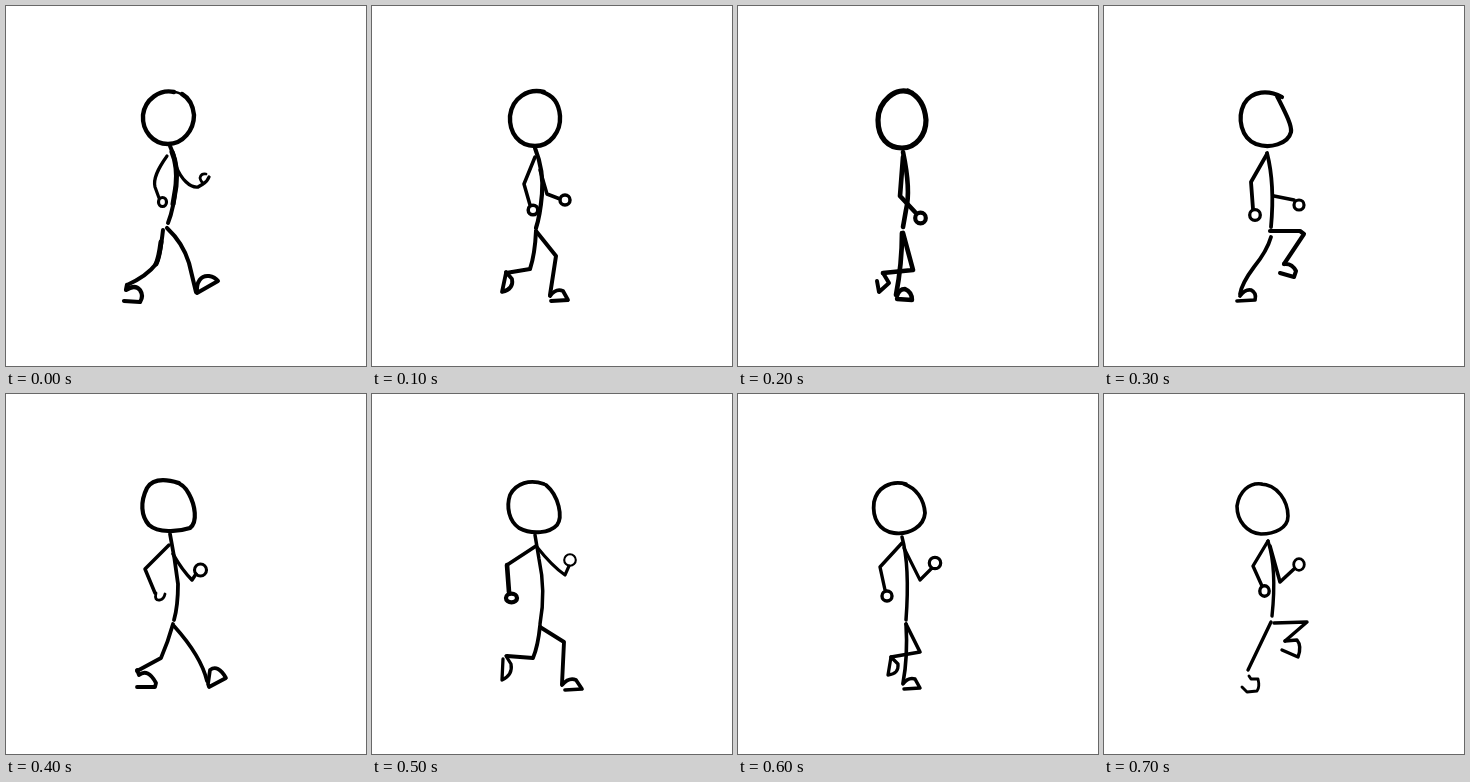
Animation, 360 px wide and 360 px high, one loop 0.8 s. Source, as an HTML page with a canvas:

```html
<!DOCTYPE html>
<html lang="en">
<head>
<meta charset="utf-8">
<title>Walk cycle</title>
<style>
html, body { margin: 0; width: 100%; height: 100%; overflow: hidden; background: #fff; }
canvas { display: block; width: 360px; height: 360px; }
</style>
</head>
<body>
<canvas id="stage" width="360" height="360"></canvas>
<script>
const ctx = document.getElementById('stage').getContext('2d');
const STEP = 100;

const oval = (x, y, rx, ry = rx) =>
  `M${x - rx} ${y}a${rx} ${ry} 0 1 0 ${2 * rx} 0a${rx} ${ry} 0 1 0 ${-2 * rx} 0`;

// Each pose lists strokes as [line width, path].
const poses = [
  [ // stride, left contact
    [4.4, 'M168 86C154 83 139 93 137 109C136 125 147 138 162 138C177 138 188 124 188 109C187 99 183 92 176 88'],
    [2.6, 'M166 85.5Q173 86 178 90'],
    [4, 'M164 140Q172 156 170 178Q168 202 162 217'],
    [5, 'M166 146Q172 160 170 180L167 198'],
    [3.2, 'M161 150C151 164 147 173 149 181L153 192' + oval(156.5, 196, 4, 4.5)],
    [3.3, 'M170 160C175 173 184 182 192 181L197 178Q201 176 203 171'],
    [2.8, 'M200 168Q195 167 194 172Q195 176 197 177'],
    [4, 'M157 224Q154 251 150 258Q141 270 121 279'],
    [5, 'M155 236Q153 252 150 258'],
    [4.2, 'M121 279L120 284Q129 278 134 284Q138 290 134 296L118 295'],
    [4.1, 'M161 222Q177 237 183 257L190 286'],
    [4, 'M191 287C190 276 195 269 203 270Q209 271 212 275L191 287']
  ],
  [ // weight settles
    [4.4, 'M172 86C156 82 140 92 138 110C137 127 147 140 163 140C178 140 189 126 188 110C187 98 181 89 170 86'],
    [4.2, 'M163 142Q172 165 170 188Q168 210 164 222'],
    [3.5, 'M163 151L152 178L158 199' + oval(161, 204, 4.8)],
    [3.5, 'M168 164L175 188L188 193' + oval(193, 194, 5)],
    [4, 'M164 225Q163 248 158 263L134 267'],
    [3.8, 'M134 267L130 286Q142 283 140 273L134 266'],
    [4, 'M164 225L184 250L178 289'],
    [3.8, 'M178 290Q184 282 191 285L196 294L179 295']
  ],
  [ // legs pass
    [5.2, 'M174 87C158 79 140 96 140 114C140 132 150 142 164 142C178 142 188 129 188 114C187 101 181 90 170 85'],
    [4.6, 'M165 146Q173 184 168 204L165 221'],
    [4.6, 'M165 151L162 190L177 206'],
    [4.2, oval(182.5, 212, 5.3)],
    [4.7, 'M165 227L175 264L145 267'],
    [4, 'M145 267L151 277L141 286L139 275'],
    [4.7, 'M164 227Q164 258 158 289'],
    [4.4, 'M159 290Q161 283 167 283Q174 286 174 294L159 293']
  ],
  [ // knee up
    [4.2, 'M178 91C165 84 148 84 140 98C133 112 137 132 152 138C166 143 184 138 187 126C188 119 181 106 173 90'],
    [3.8, 'M163 147Q171 178 167 221'],
    [3.8, 'M163 148L147 176L149 203'],
    [3.3, oval(151, 209, 5.3)],
    [3.8, 'M170 190L190 194'],
    [3.2, oval(195, 199, 5)],
    [4.1, 'M166 225L196 225L200 228L180 258'],
    [4, 'M180 258Q188 257 192 265L190 271L176 267'],
    [3.8, 'M167 231Q163 245 150 261Q138 277 136 288'],
    [3.7, 'M136 290Q141 283 147 284Q153 287 151 294L133 295']
  ],
  [ // stride, right contact
    [4.2, 'M173 89C160 85 147 84 141 94C134 108 135 122 143 131C152 139 172 138 184 134C192 128 189 111 183 100Q178 90 169 88'],
    [3.8, 'M164 140Q169 165 172 190Q172 212 168 226'],
    [3.5, 'M163 151L139 175L149 199'],
    [2.8, 'M150 199Q148 207 154 206Q158 205 159 200'],
    [3.5, 'M167 160Q176 176 186 186L190 180'],
    [3.1, oval(194.5, 176, 6)],
    [3.8, 'M167 230Q162 248 155 264L131 277'],
    [3.8, 'M131 276L133 281Q142 274 150 289L149 293L131 293'],
    [3.7, 'M168 232Q195 262 201 287'],
    [3.7, 'M202 290L204 276Q212 270 220 284L203 293Z']
  ],
  [ // weight settles, other side
    [3.9, 'M172 90C158 85 144 89 138 101C134 113 137 127 147 134C160 141 178 139 185 131C191 123 187 102 174 91'],
    [3.5, 'M163 141L167 165Q174 197 168 230'],
    [3.7, 'M164 152L135 171'],
    [4.6, 'M135 171L137 198'],
    [4.3, oval(139.5, 204, 5.5, 4.3)],
    [3.1, 'M165 153Q180 172 193 181L197 172'],
    [2.1, oval(198, 166, 5.8)],
    [3.8, 'M168 232Q166 252 161 264L135 262'],
    [3.3, 'M131 265L130 286Q141 281 139 270L134 262'],
    [3.9, 'M168 233L192 248L190 290'],
    [3.7, 'M190 291Q197 283 204 286L210 295L193 296']
  ],
  [ // legs pass, other side
    [3.8, 'M168 90C152 86 139 94 136 108C134 124 141 137 156 139C172 141 186 132 187 119C186 105 178 94 166 90'],
    [3.5, 'M164 143Q172 172 168 226'],
    [3.4, 'M164 149L142 173L147 196' + oval(149, 202, 5)],
    [3.2, 'M166 154L182 186L193 175' + oval(197, 169, 5.7)],
    [3.6, 'M168 230L182 258L153 263'],
    [3.3, 'M153 263L150 281Q161 280 160 270L153 263'],
    [3.6, 'M168 230Q170 262 165 289'],
    [3.5, 'M165 290Q170 283 177 285L182 294L166 295']
  ],
  [ // knee up, other side
    [3.6, 'M158 90C145 88 135 98 133 112C133 127 143 139 157 140C171 140 184 134 184 122C184 108 174 90 156 90'],
    [3.4, 'M164 147Q173 175 168 222'],
    [3.4, 'M164 147L149 172L158 192' + oval(160.5, 197, 4.7, 5.2)],
    [3.6, 'M166 152L176 188L190 175'],
    [2.8, oval(195, 170.5, 5.3, 5.8)],
    [3.4, 'M167 228L144 276'],
    [2.9, 'M145 282L147 285L154 285Q156 293 153 297L143 298L138 293'],
    [3.4, 'M170 229L203 228L181 247'],
    [3.4, 'M181 247L193 246Q198 252 194 263L178 256']
  ]
].map(pose => pose.map(([width, path]) => [width, new Path2D(path)]));

ctx.lineCap = ctx.lineJoin = 'round';
ctx.strokeStyle = '#000';

function draw(time) {
  ctx.fillStyle = '#fff';
  ctx.fillRect(0, 0, 360, 360);
  for (const [width, path] of poses[Math.floor(time / STEP) % poses.length]) {
    ctx.lineWidth = width;
    ctx.stroke(path);
  }
}

const start = performance.now();
function tick() {
  draw(performance.now() - start);
  requestAnimationFrame(tick);
}
tick();
</script>
</body>
</html>
```
